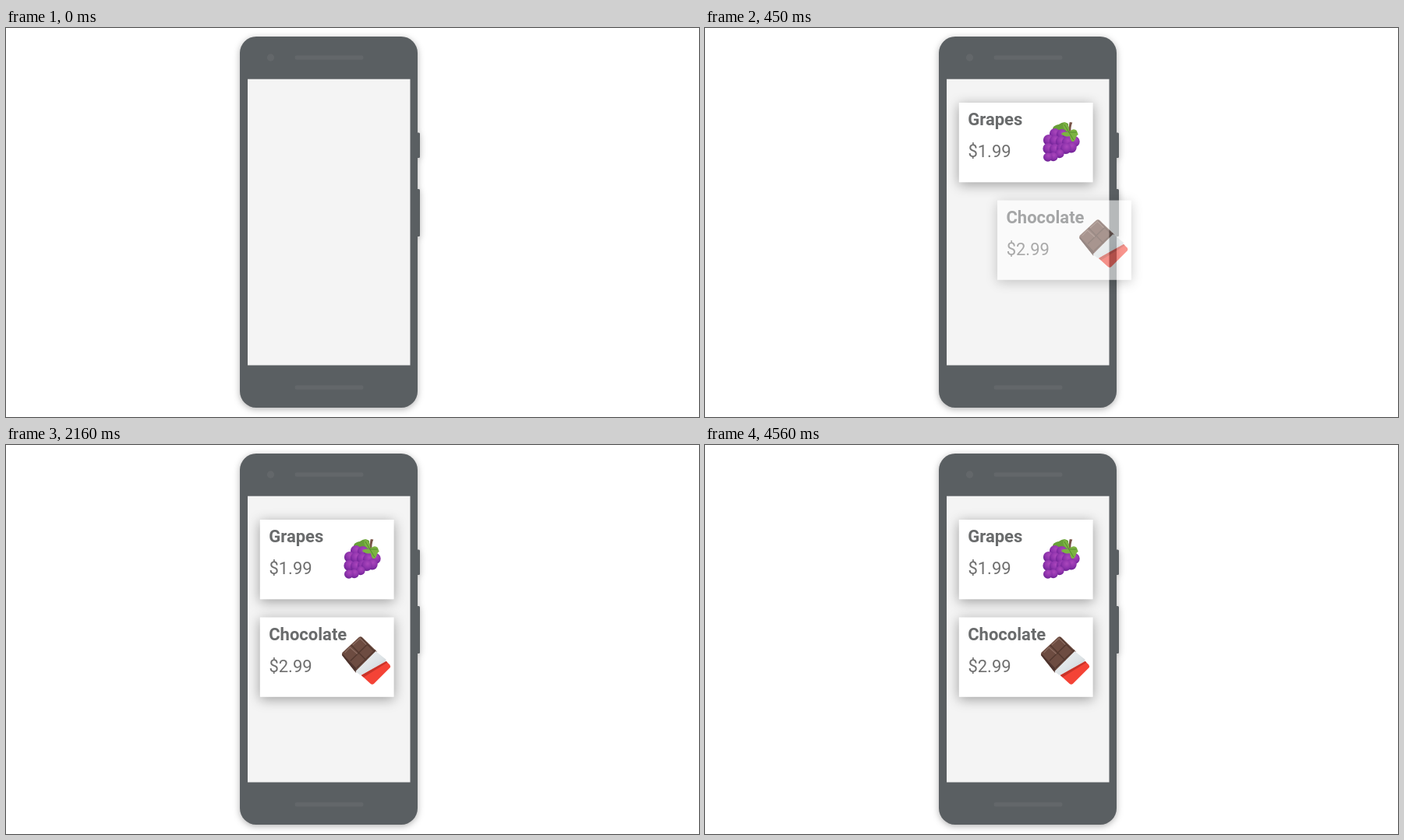
An HTML page for the animation above (4590 ms loop, 889 by 500 pixels).

```html
<!DOCTYPE html>
<html lang="en">
<head>
<meta charset="utf-8">
<title>Shopping cards</title>
<style>
  html, body { margin: 0; width: 100%; height: 100%; overflow: hidden; background: #fff; }
  svg { display: block; width: 100vw; height: 100vh; }
  text { font: 22px Roboto, sans-serif; fill: #707070; }
  .title { font-weight: 700; fill: #696b6c; }
  .phone { fill: #5a5f62; filter: drop-shadow(0 2px 4px rgba(0, 0, 0, .3)); }
  .detail { fill: #63676a; }
  .paper { fill: #fff; filter: drop-shadow(0 3px 8px rgba(0, 0, 0, .36)); }
</style>
</head>
<body>
<svg viewBox="0 0 889 500">
  <defs>
    <radialGradient id="grape" cx=".58" cy=".32" r=".72">
      <stop offset="0" stop-color="#ab47bc"/>
      <stop offset=".55" stop-color="#8e33ac"/>
      <stop offset="1" stop-color="#691f91"/>
    </radialGradient>
    <linearGradient id="foil" x1="0" y1="0" x2="1" y2="1">
      <stop offset="0" stop-color="#f2f5f6"/>
      <stop offset=".6" stop-color="#dce2e5"/>
      <stop offset="1" stop-color="#b4bdc2"/>
    </linearGradient>
  </defs>

  <g class="phone">
    <rect x="300" y="11" width="228" height="477" rx="21"/>
    <rect x="525" y="134.5" width="6" height="32.5" rx="1.5"/>
    <rect x="525" y="207" width="6" height="61" rx="1.5"/>
  </g>
  <g class="detail">
    <circle cx="339.5" cy="38" r="4.7"/>
    <rect x="370.5" y="35.2" width="88" height="5.6" rx="2.8"/>
    <rect x="370.5" y="459.2" width="88" height="5.6" rx="2.8"/>
  </g>
  <rect x="310" y="65.7" width="208.5" height="367.8" fill="#f4f4f4"/>

  <g id="grapes">
    <rect class="paper" width="171.8" height="102.3"/>
    <text class="title" x="11.4" y="29.4">Grapes</text>
    <text x="11.6" y="70">$1.99</text>
    <path d="M124 39C117 34 121 29 128 28C132 25 136 24 140 27L142 42Z" fill="#689f38"/>
    <g id="bunch"></g>
    <path d="M140 38C141 33 141 28 142 25L145.500 25.500C143.500 30 143.500 34 143.500 39Z" fill="#795548"/>
    <path d="M141 38C136 36 131 31 135 25C140 28 142 32 141.500 37C146 33 149 34 151 36L153 41
             C149 43 151 47 147 50C143 51 143 45 142 43C138 44 134 43 131 40C134 37 138 37 141 38Z" fill="#7cb342"/>
    <path d="M141 38L151 38M141 38L147 48M141 38L135 28" stroke="#558b2f" fill="none"/>
  </g>

  <g id="chocolate">
    <rect class="paper" width="171.800" height="102.300"/>
    <text class="title" x="11.400" y="29.800">Chocolate</text>
    <text x="11.600" y="70.500">$2.99</text>
    <path d="M127 25.500Q129 24 131 25.500L150 44L123 71L105.500 49Q104.500 47 106 45Z" fill="#6d4c41"/>
    <path d="M106 47L124 66L123 71L105.500 49Z" fill="#4e342e"/>
    <path d="M117 35.500L138 57M129 26L150 47M116 56L138 34.500M124 65L148 42" stroke="#543930" stroke-width="1.600" fill="none"/>
    <path d="M119 35.500L128.500 27L136.500 35M109 45.500L115.500 38.500L125 47" stroke="#8d6e63" stroke-width="1.100" fill="none"/>
    <path d="M148.500 43.500L161.500 54Q162.500 56 160 58L132 74Q129 75 127 73L122.500 69.500Z" fill="url(#foil)"/>
    <path d="M162 56.500L166.500 61Q168 63 166.500 65L146 85.500Q144 87 142 85.500L130 74.500Z" fill="#f44336"/>
    <path d="M162 56.500L163.500 58L133 77L130 74.500Z" fill="#c93429"/>
  </g>
</svg>
<script>
const LOOP = 4590;
const berries = [
  [123, 40], [132, 41], [140, 44], [115, 48], [123, 49], [148, 50], [131, 50], [139, 51],
  [114.500, 59], [144, 57.500], [123, 60], [132, 59], [137, 59], [129, 65.500], [121, 69.500], [114, 70]
];
document.getElementById("bunch").innerHTML = berries.map(([x, y], i) =>
  `<circle cx="${x}" cy="${y}" r="${i > 12 ? 5.8 : 6.9}" fill="url(#grape)"/>`).join("");

const cards = [
  { node: document.getElementById("grapes"), y: 96, from: -105, start: 30, length: 283, fade: 70 },
  { node: document.getElementById("chocolate"), y: 221.5, from: 120, start: 325, length: 225, fade: 225 }
];
const clamp = v => Math.min(1, Math.max(0, v));
const smooth = p => p * p * (3 - 2 * p);

function draw(now) {
  const time = now % LOOP;
  for (const { node, y, from, start, length, fade } of cards) {
    const shift = from * (1 - smooth(clamp((time - start) / length)));
    node.setAttribute("transform", `translate(${325.8 + shift} ${y})`);
    node.setAttribute("opacity", clamp((time - start) / fade));
  }
}

const begin = performance.now();
function tick() {
  draw(performance.now() - begin);
  requestAnimationFrame(tick);
}
tick();
</script>
</body>
</html>
```
